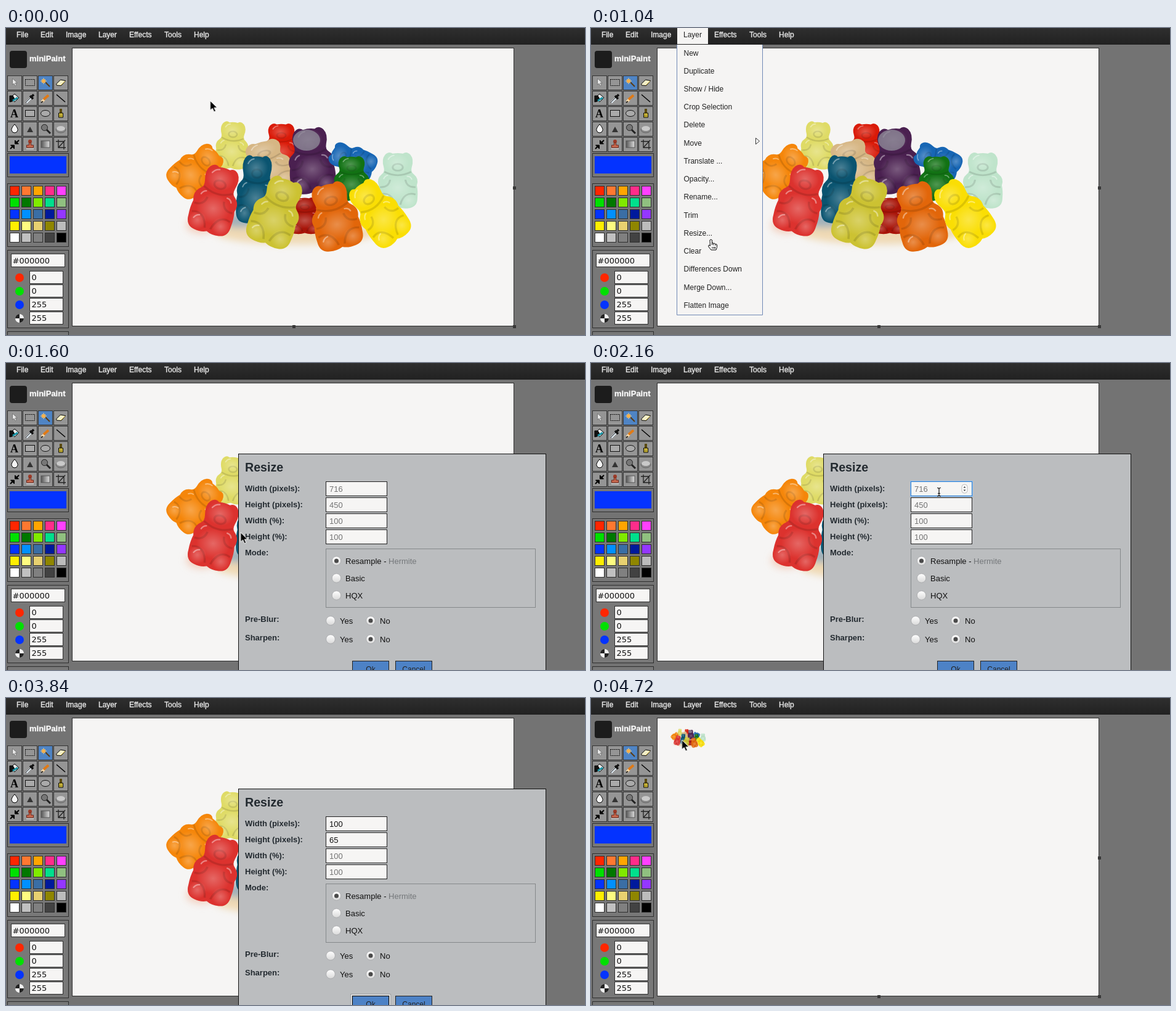
An HTML page that plays this animation: 940x498 px, repeating every 4800 ms.

```html
<!DOCTYPE html>
<html lang="en">
<head>
<meta charset="utf-8">
<title>Resizing a layer</title>
<style>
html, body { margin: 0; width: 100%; height: 100%; overflow: hidden; background: #737373; }
svg { display: block; }
text { font: 12px "Liberation Sans", Arial, sans-serif; fill: #222; white-space: pre; }
.bar { fill: #e4e4e4; }
.bar, .brand { stroke: #e4e4e4; stroke-width: .4; }
.brand { font-weight: bold; font-size: 13px; fill: #fff; }
.mono { font: 13px "DejaVu Sans", sans-serif; fill: #111; }
.title { font-weight: bold; font-size: 19.6px; fill: #232a30; }
.label { font-weight: bold; font-size: 13px; fill: #232a30; }
.value { font-size: 13px; fill: #111; }
.hint { font-size: 13px; fill: #747474; }
.soft { fill: #74777a; }
.mid { text-anchor: middle; }

.on { opacity: 0; animation: 4.8s step-end infinite; }
#before { animation-name: before; }
#after { animation-name: after; }
#menu { animation-name: menu; }
#dialog { animation-name: dialog; }
#wFocus { animation-name: wFocus; }
#hSpin { animation-name: hSpin; }
#hFocus { animation-name: hFocus; }
#okFocus { animation-name: okFocus; }
#wHint { animation-name: wHint; }
#w1 { animation-name: w1; }
#w2 { animation-name: w2; }
#w3 { animation-name: w3; }
#hHint { animation-name: hHint; }
#h1 { animation-name: h1; }
#h2 { animation-name: h2; }
#arrow { animation-name: arrow; }
#hand { animation-name: hand; }
#beam { animation-name: beam; }
#pointer { animation: travel 4.8s ease-in-out infinite; }

@keyframes before { 0% { opacity: 1 } 81.666%, to { opacity: 0 } }
@keyframes after { 0% { opacity: 0 } 81.666%, to { opacity: 1 } }
@keyframes menu { 0% { opacity: 0 } 10% { opacity: 1 } 23.333%, to { opacity: 0 } }
@keyframes dialog { 0% { opacity: 0 } 23.333% { opacity: 1 } 81.666%, to { opacity: 0 } }
@keyframes wFocus { 0% { opacity: 0 } 43.333% { opacity: 1 } 61.666%, to { opacity: 0 } }
@keyframes hSpin { 0% { opacity: 0 } 58.333% { opacity: 1 } 76.666%, to { opacity: 0 } }
@keyframes hFocus { 0% { opacity: 0 } 61.666% { opacity: 1 } 76.666%, to { opacity: 0 } }
@keyframes okFocus { 0% { opacity: 0 } 76.666% { opacity: 1 } 81.666%, to { opacity: 0 } }
@keyframes wHint { 0% { opacity: 1 } 50%, to { opacity: 0 } }
@keyframes w1 { 0% { opacity: 0 } 50%, to { opacity: 1 } }
@keyframes w2 { 0% { opacity: 0 } 53.333%, to { opacity: 1 } }
@keyframes w3 { 0% { opacity: 0 } 55%, to { opacity: 1 } }
@keyframes hHint { 0% { opacity: 1 } 66.666%, to { opacity: 0 } }
@keyframes h1 { 0% { opacity: 0 } 66.666%, to { opacity: 1 } }
@keyframes h2 { 0% { opacity: 0 } 70%, to { opacity: 1 } }
@keyframes arrow {
  0% { opacity: 1 } 8.333% { opacity: 0 } 23.333% { opacity: 1 }
  40% { opacity: 0 } 90%, to { opacity: 1 }
}
@keyframes hand { 0% { opacity: 0 } 8.333% { opacity: 1 } 23.333%, to { opacity: 0 } }
@keyframes beam {
  0% { opacity: 0 } 40% { opacity: 1 } 50% { opacity: 0 }
  56.666% { opacity: 1 } 66.666%, to { opacity: 0 }
}
@keyframes travel {
  0% { transform: translate(331.5px, 118px) }
  8.333%, 11.666% { transform: translate(166px, 13px) }
  21.666%, 25% { transform: translate(195px, 341px) }
  41.666%, 55% { transform: translate(565px, 209px) }
  60%, 88.333% { transform: translate(584px, 235px) }
  98.333%, to { transform: translate(147.5px, 68px) }
}
</style>
</head>
<body>
<svg id="stage" width="940" height="498" viewBox="0 0 940 498">
  <defs>
    <linearGradient id="barFill" x2="0" y2="1">
      <stop stop-color="#2f2f2f"/><stop offset="1" stop-color="#212121"/>
    </linearGradient>
    <linearGradient id="fade"><stop stop-color="#555"/><stop offset="1" stop-color="#ddd"/></linearGradient>
    <linearGradient id="radioFill" x2="0" y2="1">
      <stop stop-color="#fff"/><stop offset="1" stop-color="#d9d9d9"/>
    </linearGradient>
    <radialGradient id="glow">
      <stop stop-color="#fff" stop-opacity=".26"/><stop offset="1" stop-color="#fff" stop-opacity="0"/>
    </radialGradient>
    <filter id="blur" x="-20%" y="-60%" width="140%" height="220%"><feGaussianBlur stdDeviation="6"/></filter>
    <g id="bear">
      <path fill="currentColor" d="M-20-46Q-14-53-8-48Q0-50 8-48Q14-53 20-46Q26-38 22-24Q20-16 25-12Q34-4 30 8
        Q32 18 31 30Q31 46 18 48Q8 50 0 46Q-8 50-18 48Q-31 46-31 30Q-32 18-30 8Q-34-4-25-12Q-20-16-22-24Q-26-38-20-46Z"/>
      <g fill="none" stroke="#000" stroke-opacity=".12" stroke-width="3">
        <path d="M-21-16Q0-4 21-16M-28 11Q-14 12-12-2M28 11Q14 12 12-2M-28 24Q-10 18-4 42M28 24Q10 18 4 42"/>
        <ellipse cy="-24" rx="8" ry="6"/>
      </g>
      <g fill="url(#glow)">
        <ellipse cx="-2" cy="-32" rx="20" ry="17"/><ellipse cy="12" rx="24" ry="22"/>
        <circle cx="-17" cy="34" r="13"/><circle cx="17" cy="34" r="13"/>
      </g>
      <path d="M-15-38q3-6 9-7M-22-4q2-5 6-6M15-8q5 0 7 5M-23 32q2-5 7-6" fill="none"
        stroke="#fff" stroke-opacity=".4" stroke-width="2" stroke-linecap="round"/>
    </g>
    <g id="bears"></g>
  </defs>

  <rect width="940" height="27" fill="url(#barFill)"/>
  <g id="bar"></g>
  <rect x="6" y="37" width="28" height="28" rx="4" fill="#1c1c1c"/>
  <text class="brand" x="38" y="54">miniPaint</text>
  <g id="tools"></g>
  <g id="palette"></g>

  <rect x="107.500" y="32.500" width="717" height="451" fill="#f6f5f4" stroke="#2c2c2c"/>
  <use id="before" class="on" href="#bears"/>
  <g id="after" class="on">
    <use href="#bears" transform="translate(108 33) scale(.1397 .1444) translate(-108 -33)"/>
  </g>
  <path d="M823 257h5v5h-5zM465 482h5v5h-5zM823 482h5v5h-5z" fill="#383838"/>

  <g id="menu" class="on">
    <path d="M139.500 27V465.500H278.500V27" fill="#f5f4f3" stroke="#7089b5"/>
    <rect x="140" width="50" height="26" fill="#f5f4f3"/>
    <text x="150" y="15">Layer</text>
    <g id="items"></g>
    <path d="M267.500 178.500v10l6-5z" fill="#fff" stroke="#333"/>
  </g>

  <g id="dialog" class="on"></g>

  <g id="pointer">
    <path id="arrow" class="on" d="M0 0V15.500L3.700 12.200L6.300 18L9 16.900L6.500 11.300H11.400Z"
      fill="#000" stroke="#fff" stroke-width="1"/>
    <g id="hand" class="on" stroke="#000" stroke-width="1">
      <path d="M-2 3Q0 1 1.500 3V8Q3 7 4 8.500Q6 7.500 7 9.500Q9 9 9.500 11V14.500L8 19H0L-4 14Q-5 11-3 11L-1.500 12.500Z" fill="#fff"/>
      <path d="M1.500 8v3M4 8.500v3M7 9.500v2.500M2 14v3M4.500 14v3M6.500 14v3" fill="none"/>
    </g>
    <path id="beam" class="on" d="M-3-6.500Q0-6.500 0-4.500Q0-6.500 3-6.500M0-5V6M-3 7Q0 7 0 5Q0 7 3 7M-2 2.500H2"
      fill="none" stroke="#111" stroke-width="1.200"/>
  </g>
</svg>

<script>
const $ = id => document.getElementById(id);
const put = (id, parts) => { $(id).innerHTML = parts.join(''); };
const text = (x, y, s, cls = '', id = '') =>
  `<text x="${x}" y="${y}" class="${cls}"${id && ` id="${id}"`}>${s}</text>`;
// Box with a one-pixel border; x, y, w, h are its outer edges.
const box = (x, y, w, h, fill, stroke = '#2e2e2e') =>
  `<rect x="${x + .5}" y="${y + .5}" width="${w - 1}" height="${h - 1}" fill="${fill}" stroke="${stroke}"/>`;
const dot = (x, y, r, fill) => `<circle cx="${x}" cy="${y}" r="${r}" fill="${fill}"/>`;

const tabs = { File: 17, Edit: 56, Image: 97, Layer: 150, Effects: 200, Tools: 257, Help: 305 };
put('bar', Object.entries(tabs).map(([s, x]) => text(x, 15, s, 'bar')));

put('items', ['New', 'Duplicate', 'Show / Hide', 'Crop Selection', 'Delete', 'Move',
  'Translate ...', 'Opacity...', 'Rename...', 'Trim', 'Resize...', 'Clear',
  'Differences Down', 'Merge Down...', 'Flatten Image']
  .map((s, i) => text(150.500, Math.floor(45 + i * 29.249), s)));

// Tool icons, each drawn in a 24 px cell.
const line = (d, color = '#000', w = 1.500) =>
  `<path d="${d}" fill="none" stroke="${color}" stroke-width="${w}"/>`;
const shape = (d, fill, stroke = '#000') => `<path d="${d}" fill="${fill}" stroke="${stroke}"/>`;
const icons = [
  shape('M8.500 5v10l2.500-2 2 4 2-1-2-4h3.500z', '#e6e6e6', '#777'),
  '<rect x="4.500" y="6.500" width="15" height="10" fill="none" stroke="#111" stroke-dasharray="2 1"/>',
  line('M12 11l7 7', '#5c3b12', 2) + line('M9 4v10M4 9h10M6 6l6 6M12 6l-6 6', '#ffd98a', 1) + dot(9, 9, 3, '#f9b24a'),
  shape('M4.500 14l7-7 8 1.500-7 8-7-.500z', '#f4efc8') + line('M12 16l7-7', '#d6b73c', 1),
  shape('M6 10l6-5 7 6-7 7z', '#e8e8e8') + shape('M4 8h5l3 5-4 4-4 1z', '#111') + line('M9 16l8-5', '#1796a8', 3),
  line('M6 19l8-8', '#e8f4ff', 3) + line('M5 19l8-8', '#222', 1) + line('M12 8l5 5M14 10l4-4', '#111', 3.500),
  line('M6 18l4-4', '#f7d9a8', 4) + line('M9 14l8-7', '#e07a16', 4) + line('M5 19l3-2', '#222', 2),
  line('M5 6l14 12'),
  '<text x="11.500" y="18" class="mid" style="font:bold 18px \'Liberation Serif\',serif;fill:#000">A</text>',
  '<rect x="4.500" y="6.500" width="15" height="10" fill="#aaa" stroke="#111"/>',
  '<ellipse cx="12" cy="11.500" rx="7.500" ry="5" fill="#aaa" stroke="#111"/>',
  line('M12 4v7', '#5a4a10', 4) + shape('M8.500 11h7v7h-7z', '#e5cf45') + line('M10.500 13v5M13 13v5', '#6d5f12', 1),
  shape('M12 4q-6 7-5 10q1 4 5 4t5-4q1-3-5-10z', '#f4f4f4'),
  shape('M12 8l5 9H7z', '#333', 'none'),
  line('M14 13l6 6', '#222', 3) + '<circle cx="10.500" cy="9.500" r="5" fill="#777" stroke="#222"/>',
  '<ellipse cx="12" cy="13" rx="8" ry="5" fill="#888" stroke="#666"/><ellipse cx="12" cy="11" rx="7" ry="4" fill="#c9c9c9"/>',
  line('M5 19l5-5M19 5l-5 5', '#000', 2) + shape('M5.500 13h6v6zM12.500 5v6h6z', '#000'),
  dot(12, 7, 3, '#9c3b28') + shape('M10.500 9h3v4h4v4h-11v-4h4z', '#c96a50', '#6d2418') + line('M6 19h12', '#eee', 1),
  '<rect x="5" y="6" width="14" height="11" fill="url(#fade)" stroke="#555"/>',
  line('M8 4v13h12M4 7h13v13M8 17l11-12', '#222', 1.300)
];
put('tools', icons.map((icon, i) => {
  const x = 2 + i % 4 * 25, y = 77 + (i >> 2) * 25;
  return box(x, y, 24, 24, i === 2 ? '#4f84c4' : '#959595', '#333') +
    `<g transform="translate(${x} ${y})">${icon}</g>`;
}));

const swatches = ('ff2600 ff7830 ffa500 ff2d8a ff40ff 00e000 007800 80ea00 00e08c 90c080 ' +
  '0433ff 0090ff 3a6ea5 001a9c 9437ff ffee00 fffb80 e8d070 8f8600 bcbcbc ' +
  'ffffff c0c0c0 808080 424242 000000').split(' ');
const channels = [['#ff2600', 0], ['#00e000', 0], ['#0433ff', 255], ['#f4f4f4', 255]];
put('palette', [
  box(2, 203, 100, 39, '#787878'), '<rect x="6" y="208" width="92" height="28" fill="#0433ff"/>',
  box(2, 252, 100, 103, '#787878'),
  ...swatches.map((c, i) => box(6 + i % 5 * 19, 256 + Math.floor(i / 5) * 19, 16, 16, '#' + c)),
  box(2, 360, 100, 127, '#787878'), box(2, 492, 100, 20, '#787878'),
  box(8, 366, 88, 22, '#f6f5f4'), text(10.500, 382, '#000000', 'mono'),
  ...channels.map(([c, v], i) => {
    const y = 394 + i * 22;
    return dot(22, y + 11, 7, c) + box(38, y, 55, 21, '#f6f5f4') + text(41.500, y + 15, v, 'mono');
  }),
  '<path d="M22 471v-7a7 7 0 0 0-7 7zM22 471v7a7 7 0 0 0 7-7z" fill="#222"/>'
]);

// x, y, width, height, tilt, colour; back to front.
const bears = [
  [367, 191, 54, 78, 4, '#dfdb66'], [447, 192, 58, 74, 0, '#da1a08'],
  [424, 222, 78, 78, -15, '#d6b684'], [496, 216, 76, 108, -5, '#4a2050'],
  [563, 217, 54, 76, -62, '#1766b4'], [636, 248, 66, 92, 0, '#bfe4cb'],
  [308, 231, 64, 92, 48, '#f5860a'], [561, 245, 58, 74, 0, '#127214'],
  [406, 263, 64, 112, 3, '#0a5470'], [340, 280, 74, 112, 16, '#dc322e'],
  [485, 305, 56, 60, 0, '#a81408'], [439, 299, 78, 114, 20, '#ccc232'],
  [534, 306, 78, 110, -14, '#e2660a'], [605, 300, 70, 112, -36, '#fade04']
];
put('bears', [
  '<g filter="url(#blur)"><ellipse cx="470" cy="332" rx="130" ry="19" fill="#efd9b4"/>',
  '<ellipse cx="380" cy="312" rx="34" ry="12" fill="#9fb0ba"/>',
  '<ellipse cx="318" cy="320" rx="26" ry="14" fill="#f3d2c2"/></g>',
  ...bears.map(([x, y, w, h, tilt, c]) =>
    `<use href="#bear" color="${c}" transform="translate(${x} ${y}) rotate(${tilt}) scale(${w / 64} ${h / 100})"/>` +
    (c === '#4a2050' ? '<ellipse cx="488" cy="182" rx="22" ry="17" fill="#8d8797" opacity=".8"/>' : ''))
]);

const field = y => box(519, y, 100, 24, '#f6f5f4', '#222');
const ring = y =>
  `<rect x="518.500" y="${y - .5}" width="101" height="25" fill="none" stroke="#8fbdee"/>` +
  box(519, y, 100, 24, 'none', '#2f7fd0');
const spin = y => `<rect x="602" y="${y + 5}" width="9" height="14" rx="4" fill="#fff" stroke="#bbb"/>` +
  shape(`M604.500 ${y + 10.500}l2-2.500 2 2.500zM604.500 ${y + 13.500}l2 2.500 2-2.500z`, '#444', 'none');
const radio = (x, y, picked) =>
  `<circle cx="${x}" cy="${y}" r="7.300" fill="url(#radioFill)" stroke="#a2a4a6" stroke-width=".8"/>` +
  (picked ? dot(x, y, 3.500, '#4a4a4a') : '');
const group = (id, inner) => `<g id="${id}" class="on">${inner}</g>`;
const yesNo = y => radio(527, y, false) + text(542, y + 5, 'Yes', 'value') +
  radio(592, y, true) + text(607, y + 5, 'No', 'value');
const button = (x, s) => box(x, 483, 60, 30, '#4d82c6', '#222') + text(x + 30, 501, s, 'mid');
const labels = { 'Width (pixels):': 208, 'Height (pixels):': 234, 'Width (%):': 260,
  'Height (%):': 286, 'Mode:': 312, 'Pre-Blur:': 420, 'Sharpen:': 450 };

put('dialog', [
  box(377, 147, 500, 400, '#bbbdbf', '#111'),
  text(388, 176, 'Resize', 'title'),
  ...Object.entries(labels).map(([s, y]) => text(388, y, s, 'label')),
  ...[192, 218, 244, 270].map(field),
  group('wFocus', ring(192) + spin(192)), group('hFocus', ring(218)), group('hSpin', spin(218)),
  text(525, 209, '716', 'hint on', 'wHint'), text(525, 235, '450', 'hint on', 'hHint'),
  text(525, 261, '100', 'hint'), text(525, 287, '100', 'hint'),
  ...['1', '0', '0'].map((s, i) => text(525 + i * 7.230, 209, s, 'value on', 'w' + (i + 1))),
  ...['6', '5'].map((s, i) => text(525 + i * 7.230, 235, s, 'value on', 'h' + (i + 1))),
  box(519, 301, 341, 96, 'none', '#85888a'),
  ...['Resample - <tspan class="soft">Hermite</tspan>', 'Basic', 'HQX'].map((s, i) =>
    radio(536.500, 321 + i * 28, i === 0) + text(551, 326 + i * 28, s, 'value')),
  yesNo(418), yesNo(448),
  button(562, 'Ok'), button(632, 'Cancel'),
  group('okFocus', box(560, 481, 64, 30, 'none', '#f4f4f4') + box(562, 483, 60, 30, 'none', '#111') +
    '<rect x="559.500" y="480.500" width="65" height="30" fill="none" stroke="#777" stroke-dasharray="1 1"/>')
]);
</script>
</body>
</html>
```
